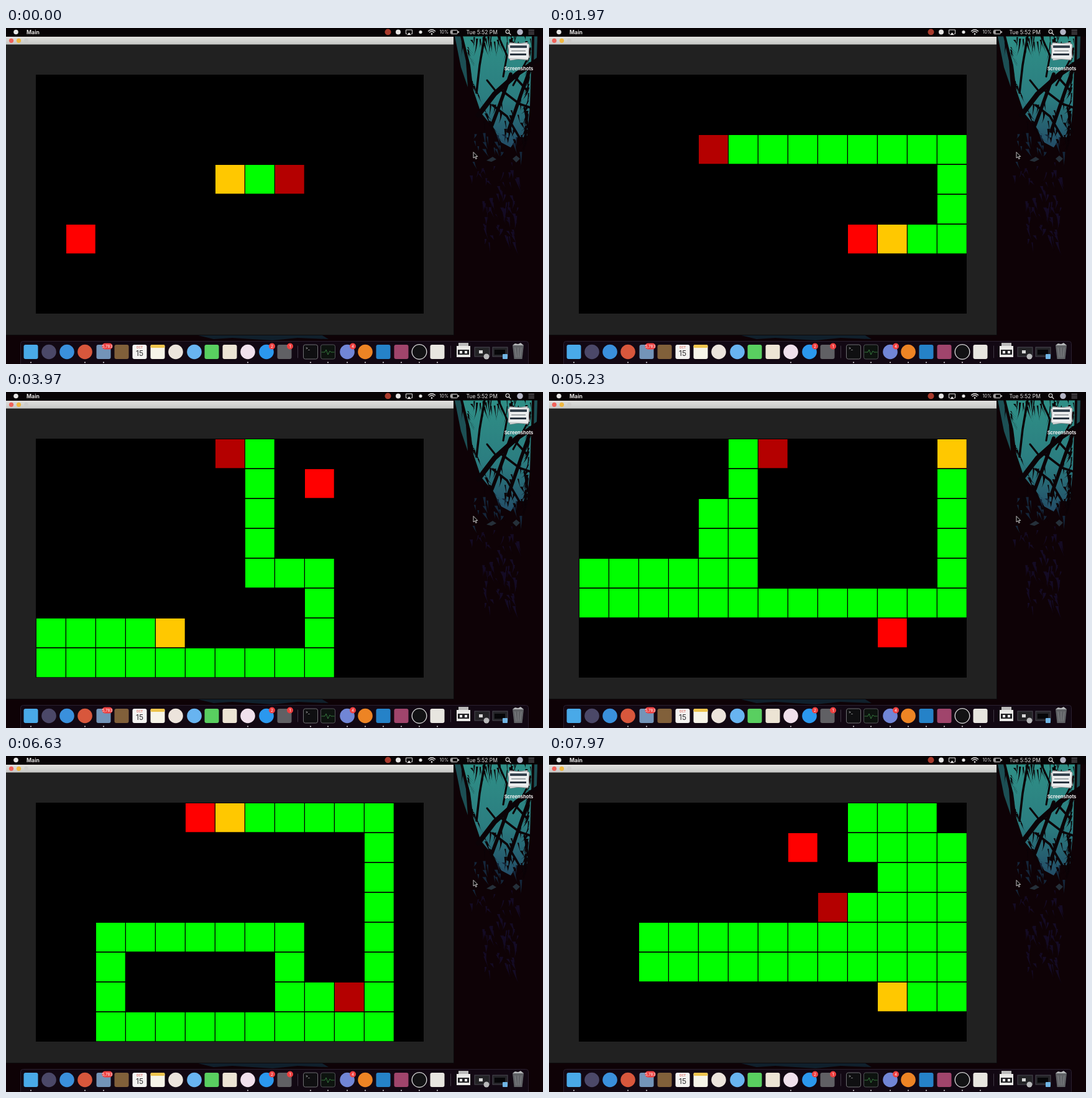
Recreate the animation shown at these times as an HTML page with a canvas. Size 864 by 540 pixels, loop 8000 ms.

```html
<!DOCTYPE html>
<html lang="en">
<head>
<meta charset="utf-8">
<title>Snake</title>
<style>
  html, body { margin: 0; width: 100%; height: 100%; overflow: hidden; background: #0e0206; }
  svg, canvas { position: absolute; left: 0; top: 0; display: block; }
  canvas { left: 48px; top: 75px; }
  text { font-family: Inter, "Open Sans", sans-serif; }
</style>
</head>
<body>
<svg id="desk" width="864" height="540" viewBox="0 0 864 540"></svg>
<canvas id="board" width="624" height="384"></canvas>
<script>
const LOOP = 8000, FRAME = 1000 / 30, TICK = 28.89, CELL = 48;

// ---- small SVG helpers ----
const rect = (x, y, w, h, fill, extra = '') =>
  `<rect x="${x}" y="${y}" width="${w}" height="${h}" fill="${fill}" ${extra}/>`;
const disc = (x, y, r, fill, extra = '') =>
  `<circle cx="${x}" cy="${y}" r="${r}" fill="${fill}" ${extra}/>`;
const shape = (d, fill, extra = '') => `<path d="${d}" fill="${fill}" ${extra}/>`;
const line = (d, color, width = 1) =>
  shape(d, 'none', `stroke="${color}" stroke-width="${width}" stroke-linecap="round"`);
const label = (x, y, size, str, fill, extra = '') =>
  `<text x="${x}" y="${y}" font-size="${size}" fill="${fill}" ${extra}>${str}</text>`;

let seed = 7;
const random = () => (seed = seed * 16807 % 2147483647) / 2147483647;
const between = (a, b) => a + (b - a) * random();
const blade = (x, y, dx, dy, width, fill) =>
  shape(`M${x} ${y}q${dx * .2} ${dy * .6} ${dx} ${dy}q${-dx * .6} ${-dy * .3} ${-dx - width} ${-dy}z`, fill);

function wallpaper() {
  const night = '#0e0206', bark = '#0b0307';
  let s = `<defs>
    <linearGradient id="sky" x1="0" y1="0" x2="0" y2="1">
      <stop offset="0" stop-color="#2f8f86"/><stop offset=".55" stop-color="#2b7d80"/>
      <stop offset="1" stop-color="#234c66"/>
    </linearGradient>
    <linearGradient id="title" x1="0" y1="0" x2="0" y2="1">
      <stop offset="0" stop-color="#e0e0de"/><stop offset="1" stop-color="#c6c7c5"/>
    </linearGradient></defs>`;
  s += rect(0, 0, 864, 540, night);
  s += shape('M735 13H846L845 60L843 125L838 178L824 174L812 192L797 184L782 158L764 136L752 100L747 60Z', 'url(#sky)');
  s += shape('M722 13h9l9 40l3 42l-11 -32zM850 13h5l-1 34l-5 14z', '#1c4f54');

  // branches crossing the clearing
  s += line('M864 46L822 74L786 106L760 140', bark, 8);
  s += line('M812 74L794 124L782 156M846 58L828 108L808 166', bark, 5.5);
  s += line('M770 13L762 60L757 104M796 99L826 122L844 128M783 124L806 142L826 176M818 78L838 100', bark, 3.5);
  s += line('M792 13L806 44L800 78M838 52L816 92M774 84L790 104M834 128L842 168', bark, 3);

  // hanging leaves
  for (let i = 0; i < 34; i++)
    s += blade(between(736, 848), between(8, 24), between(-8, 8), between(10, 34), between(1, 4), bark);
  for (let i = 0; i < 70; i++) {
    const y = between(30, 185), left = random() < .5;
    const x = left ? 744 + Math.max(0, y - 70) * .45 : 846 - y * .04;
    s += blade(x, y, between(3, 15) * (left ? 1 : -1), between(8, 26), between(1, 5), bark);
  }
  for (let i = 0; i < 26; i++)
    s += blade(between(764, 842), between(100, 180), between(-7, 7), between(10, 26), between(2, 5), bark);

  // dim undergrowth
  for (let i = 0; i < 80; i++) {
    const y = between(165, 350), spread = y > 240 ? 28 : 48;
    const color = y < 215 ? '#14263a' : '#140b24';
    s += blade(between(798 - spread, 798 + spread), y, between(-9, 9), between(8, 24), between(2, 6), color);
  }
  s += shape('M773 213l10 -6l6 4l-8 4zM815 210l6 -5l6 5l-6 6z', '#25303a');
  s += shape('M305 493h202l12 7l-50 -2l-40 4l-65 -4l-30 2z', '#10202c');
  return s;
}

function menuBar() {
  const ink = '#e6e5e4';
  let s = rect(0, 0, 864, 13.5, '#070305');
  s += disc(16, 6.5, 3.8, ink);
  s += label(33, 9.7, 8.7, 'Main', ink, 'font-weight="700"');
  s += disc(614.5, 6.5, 5, '#a83a2c');
  s += disc(631, 6.5, 4, ink);
  s += shape('M645 9.5h-1.5v-6.5h10v6.5h-1.5', 'none', `stroke="${ink}"`) + shape('M645 11.2l3.5 -4l3.5 4z', ink);
  s += disc(667, 6.5, 2.6, ink);
  s += line('M679.5 5Q685 .5 690.5 5M681.5 7Q685 4 688.5 7', ink, 1.3) + disc(685, 9.6, 1.3, ink);
  s += label(697.5, 9.3, 7.2, '10%', ink);
  s += rect(715.5, 3.5, 11, 6, 'none', `rx="1" stroke="${ink}"`) + rect(716.5, 4.5, 2, 4, ink) + rect(727.5, 5, 1.3, 3, ink);
  s += label(740.5, 9.7, 8.5, 'Tue 5:52 PM', ink);
  s += disc(807, 5.7, 2.9, 'none', `stroke="${ink}" stroke-width="1.1"`) + line('M809.3 8L812 10.8', ink, 1.2);
  s += disc(827, 6.5, 4.8, '#b3b4c4');
  s += line('M841 3.5h8.5M841 6.5h8.5M841 9.5h8.5', '#85848a', 1.1);
  return s;
}

function gameWindow() {
  return rect(0, 14, 721, 480, '#0b0a0c') + rect(0, 26, 720, 467, '#212121')
    + rect(0, 14, 720, 12.5, 'url(#title)')
    + disc(8.5, 20.3, 3.6, '#f0625a') + disc(20.5, 20.3, 3.6, '#f0b840') + disc(32.5, 20.3, 3.4, '#cdcdcb');
}

function desktopFolder() {
  let s = '';
  for (const angle of [-8, 7, 2])
    s += rect(809, 25, 32, 25, '#ebeced', `transform="rotate(${angle} 825 38)" stroke="#75797c" stroke-width=".5"`);
  s += rect(811, 28, 27, 4, '#34404c') + rect(813, 36, 23, 1.5, '#8b9296') + rect(811, 41, 26, 3, '#2a3440');
  s += label(825, 68.3, 7.6, 'Screenshots', '#f3f2f2', 'font-weight="700" text-anchor="middle"');
  return s;
}

function dock() {
  let s = rect(23.5, 503.5, 817, 40, '#120813', 'rx="4" stroke="#2a2030"');
  const square = (x, fill, extra = '') => rect(x - 11.5, 509, 23, 23, fill, `rx="3" ${extra}`);
  const round = (x, fill, extra = '') => disc(x, 520.5, 11.8, fill, extra);
  const badge = (x, str, w = 10) =>
    rect(x - w / 2, 506.5, w, 10, '#ee4040', 'rx="5"') +
    label(x, 514, 6.3, str, '#fff', 'text-anchor="middle"');

  const circles = { 69: '#4b4868', 98: '#3a90dc', 127: '#d8573c', 273: '#ece4dc', 303: '#68b4f0',
    389: '#f0e0ec', 419: '#2b98ee', 549: '#7186d6', 578: '#ed8424' };
  const squares = { 40: '#49a9e8', 157: '#7394b8', 186: '#81603a', 331: '#59cf60', 360: '#ece4d4',
    448: '#606064', 607: '#2582c8', 636: '#a0456c', 694: '#e8e6e0' };
  for (const x in circles) s += round(+x, circles[x]);
  for (const x in squares) s += square(+x, squares[x]);

  s += square(215, '#f4f3f1') + label(215, 515, 5, 'OCT', '#d84236', 'text-anchor="middle"')
    + label(215, 527, 12, '15', '#2d2d2f', 'text-anchor="middle"');
  s += square(244, '#f6f4e8') + rect(232.5, 509, 23, 5, '#eec44c', 'rx="2"');
  s += square(490, '#0f0f11', 'stroke="#6f6f72"') + label(482, 517, 6, '&gt;_', '#eee');
  s += square(518, '#0d130f', 'stroke="#505355"') + line('M508 521h5l2 -4l3 8l3 -6l2 2h5', '#3f8d48', .8);
  s += round(665, '#121214', 'stroke="#dcdcdc" stroke-width="1.3"');

  s += rect(725, 511, 22, 18, '#e8e8e6') + rect(728, 506, 16, 5, '#bababa') + rect(727, 517, 18, 8, '#232326')
    + rect(730, 519, 4, 4, '#eee') + rect(738, 519, 4, 4, '#eee');
  s += rect(754, 513, 24, 15, '#232326', 'stroke="#4a4852"') + rect(761, 518, 6, 5, '#d6d6d6') + disc(773, 528, 4.5, '#b9b9bb');
  s += rect(783, 513, 24, 15, '#242428', 'stroke="#4a4852"') + rect(786, 517, 17, 8, '#060608') + rect(799, 524, 8, 8, '#70b5e4', 'rx="1"');
  s += shape('M815 510h18l-2.5 22h-13z', '#606266') + shape('M815 510l4 -3l5 1l4 -2l5 4z', '#b6b8ba')
    + line('M819 514l2 15M824 514v15M829 514l-2 15', '#909296', .7);

  s += badge(163, '5,783', 17) + badge(428, '2') + badge(457, '1') + badge(558, '4');
  s += line('M469.5 511v19M715.5 511v19', '#4c4652', .8);
  for (const x of [40, 127, 157, 389, 490, 518, 549, 578, 607, 636, 665, 694])
    s += disc(x, 537.5, 1.1, '#d2d0d4');
  return s;
}

const pointer = shape('M752 199.5v9.5l2.3 -2l1.6 3.6l1.5 -.7l-1.6 -3.4h3z', '#080808', 'stroke="#eee" stroke-width=".8"');
document.getElementById('desk').innerHTML =
  wallpaper() + gameWindow() + menuBar() + desktopFolder() + dock() + pointer;

// ---- snake: runs of moves, a star marks a meal at the end of a run ----
const ROUTE = `L7 D2* R3 U4* R2 D3* L4 D2* R6* R3 U6*
  L4* L4* L2 D2* R7* R4 D2* D1 L3* D2* L9* U1 R5 U6*
  R2* R5 D2* D2 L3* L3 U4* R1 D4* R2 D3* L9* U1 R6
  U5 R3* U1 L4 D2* L1 D1* R1 D1* L5* D1 R12 U5*
  L5 D3 R3 D3* L2 U2* L6 D3* R9 U7* L6*
  D3 R6 U1 L1 U1 L1 U1* R2 D1 R1 D3* L10* D1 R10* D1 L5 U5*`;
const MOVES = { L: [-1, 0], R: [1, 0], U: [0, -1], D: [0, 1] };
const START_LENGTH = 3;
const path = [[8, 3]], meals = [];
for (const [, dir, count, meal] of ROUTE.matchAll(/([LRUD])(\d+)(\*?)/g)) {
  for (let i = 0; i < +count; i++) {
    const [x, y] = path[path.length - 1], [dx, dy] = MOVES[dir];
    path.push([x + dx, y + dy]);
  }
  if (meal) meals.push(path.length - 1);
}

const ctx = document.getElementById('board').getContext('2d');
function cell([x, y], color) {
  ctx.fillStyle = color;
  ctx.fillRect(x * CELL + 1, y * CELL + 1, 46.7, 46.3);
}

function draw(time) {
  const frame = Math.floor((time % LOOP + 4) / FRAME) % (LOOP / FRAME);
  const head = START_LENGTH - 1 + Math.floor(frame * FRAME / TICK);
  const eaten = meals.filter(m => m <= head).length;
  const tail = head - (START_LENGTH + eaten - 1);
  ctx.fillStyle = '#000';
  ctx.fillRect(0, 0, 624, 384);
  cell(path[meals[eaten]], '#ff0000');
  for (let i = tail + 1; i < head; i++) cell(path[i], '#00ff00');
  cell(path[tail], '#b40000');
  cell(path[head], '#ffc800');
}

const began = performance.now();
function play() {
  draw(performance.now() - began);
  requestAnimationFrame(play);
}
play();
</script>
</body>
</html>
```
